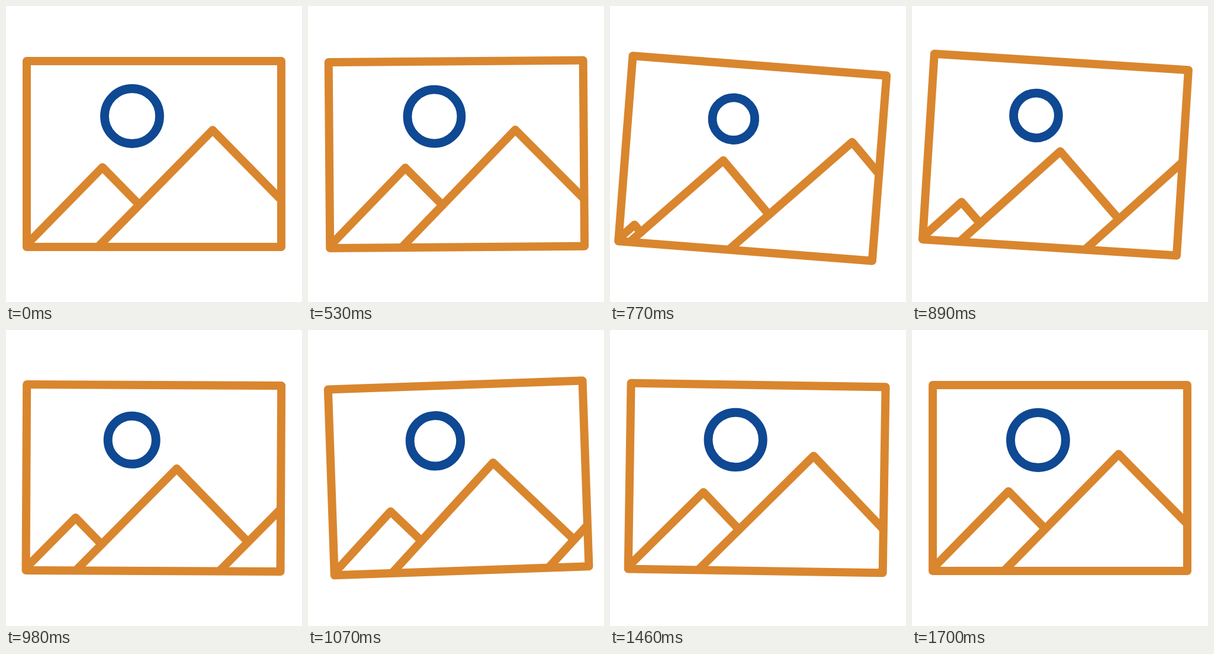
An HTML page for the animation above (1.73 s loop, 500 by 500 pixels).

```html
<!DOCTYPE html>
<html lang="en">
<head>
<meta charset="utf-8">
<title>Swinging picture</title>
<style>
  html, body { margin: 0; width: 100%; height: 100%; overflow: hidden; background: #fff; }
  svg { display: block; width: 100%; height: 100%; }
</style>
</head>
<body>
<svg viewBox="0 0 500 500" fill="none" stroke="#d9862e" stroke-width="14" stroke-linecap="round" stroke-linejoin="round">
  <clipPath id="inside"><rect x="35" y="93" width="430" height="314"/></clipPath>
  <g id="picture">
    <g clip-path="url(#inside)">
      <polyline class="hill"/>
      <polyline class="hill"/>
      <polyline class="hill"/>
    </g>
    <rect x="35" y="93" width="430" height="314"/>
    <circle id="sun" cx="213" cy="186" r="46.5" stroke="#0f4893" stroke-width="14.8"/>
  </g>
</svg>
<script>
const LOOP = 1730, START = 500, END = 1700, STEP = 30;
const PIVOT = [250, 130];
const GROUND = 406, SLOPE = 1.02;

const picture = document.getElementById('picture');
const sun = document.getElementById('sun');
const hills = document.querySelectorAll('.hill');

// Where each hill's slopes meet the ground; every hill travels to the next place.
const LEFT = [32, 32, 156.4, 468];
const RIGHT = [32, 294, 541.6, 853];
// Swing angle in degrees at its turning points.
const SWING = [[500, 0], [597, -2.1], [808, 5], [1092, -2.1], [1395, 1], [1700, 0]];

const lerp = (a, b, p) => a + (b - a) * p;
const clamp = v => Math.min(1, Math.max(0, v));
const sine = p => (1 - Math.cos(Math.PI * p)) / 2;

// Cubic bezier easing (x1, 0, x2, 1), solved by bisection.
const bezier = (x1, x2) => x => {
  if (x <= 0 || x >= 1) return clamp(x);
  let lo = 0, hi = 1;
  for (let i = 0; i < 24; i++) {
    const s = (lo + hi) / 2, r = 1 - s;
    const at = 3 * r * r * s * x1 + 3 * r * s * s * x2 + s * s * s;
    if (at < x) lo = s; else hi = s;
  }
  return lo * lo * (3 - 2 * lo);
};
const glide = bezier(.385, .153);
const dash = bezier(.45, .053);
const LEFT_EASE = [glide, dash, glide];

function swing(t) {
  const i = SWING.findIndex(([time]) => t < time);
  if (i < 1) return 0;
  const [t0, a] = SWING[i - 1], [t1, b] = SWING[i];
  return lerp(a, b, sine((t - t0) / (t1 - t0)));
}

// Top of the triangle that stands on the ground between two points.
const apex = (left, right) => [(left + right) / 2, GROUND - SLOPE * (right - left) / 2];

function render(time) {
  const t = START + Math.max(0, Math.floor((time % LOOP - START) / STEP) * STEP);
  const progress = (t - START) / (END - START);

  const drop = 8.5 * Math.sin(Math.PI * clamp((t - START) / 450)) ** 2;
  picture.setAttribute('transform', `translate(0 ${drop}) rotate(${swing(t)} ${PIVOT})`);

  const left = LEFT_EASE.map((ease, i) => lerp(LEFT[i], LEFT[i + 1], ease(progress)));
  const right = LEFT_EASE.map((_, i) => lerp(RIGHT[i], RIGHT[i + 1], glide(progress)));
  hills.forEach((hill, i) => {
    const end = i < 2 ? apex(left[i + 1], right[i]) : [right[i], GROUND];
    hill.setAttribute('points', [[left[i], GROUND], apex(left[i], right[i]), end].join(' '));
  });

  const shrink = t < 650 ? sine((t - START) / 150) : 1 - glide((t - 650) / (END - 650));
  sun.setAttribute('r', 46.5 - 11.1 * shrink);
}

const origin = performance.now();
function tick() {
  render(performance.now() - origin);
  requestAnimationFrame(tick);
}
tick();
</script>
</body>
</html>
```
